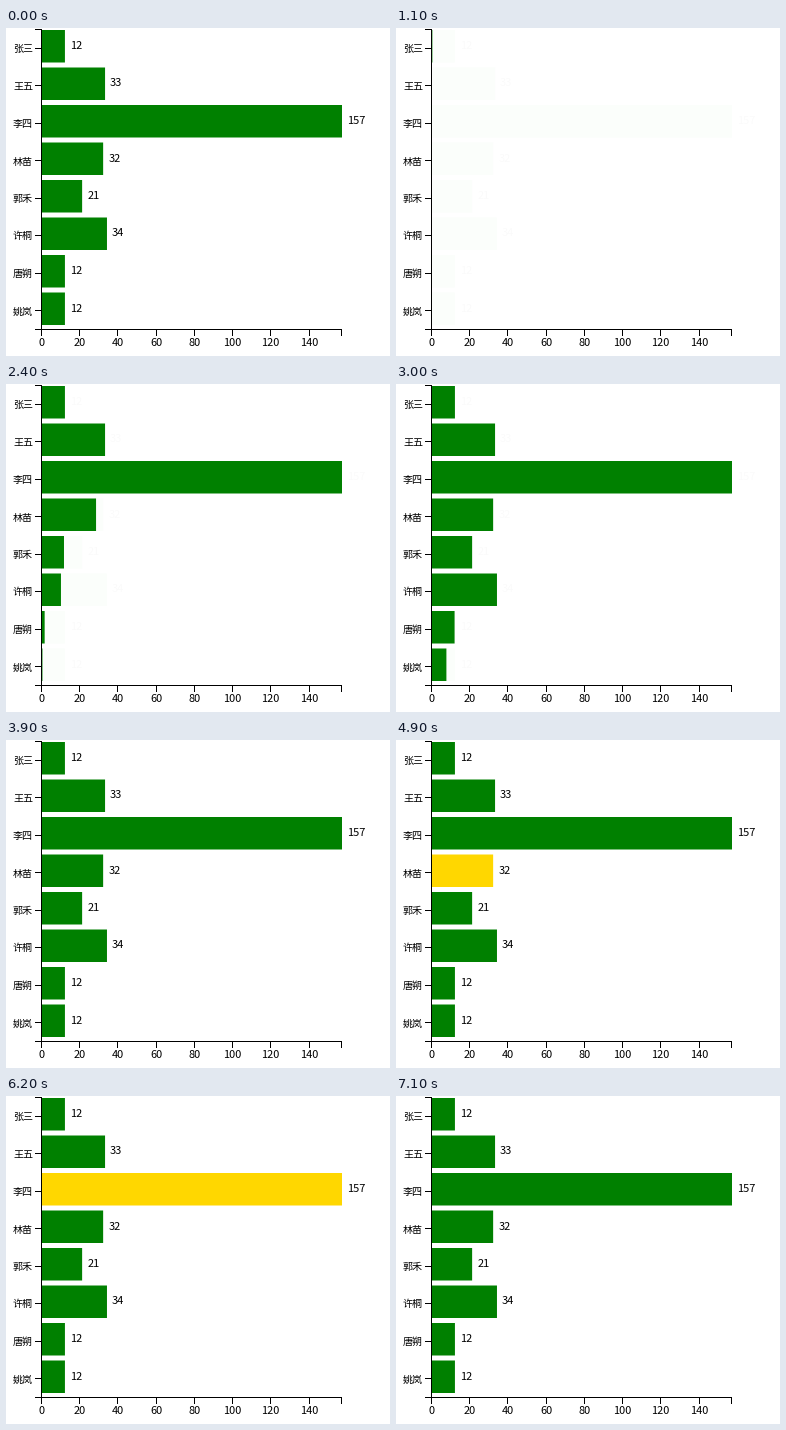
Animation of 384 by 328 pixels, one loop 7.6 s. Source, as a matplotlib script:

```python
import matplotlib.pyplot as plt
from matplotlib.animation import FuncAnimation
from matplotlib.patches import Rectangle

W, H, DPI = 384, 328, 64
STEP_MS, LOOP_MS = 100, 7600
GREEN, GOLD, GHOST = "#008000", "#ffd700", "#fbfefb"

NAMES = ["张三", "王五", "李四", "林苗", "郭禾", "许桐", "唐朔", "姚岚"]
VALUES = [12, 33, 157, 32, 21, 34, 12, 12]
SCALE = 300 / max(VALUES)
BAND, BAR_HEIGHT = 37.5, 32.5
LEFT, TOP, BOTTOM, RIGHT = 35, 1, 301, 335

RELOAD_MS = 1100
GROW_START, GROW_DELAY, GROW_MS = 983, 184, 920
FADE_START, FADE_MS = 3400, 500
GHOST_ALPHA = 0.02

# Time at which the pointer moves, and the bar it then rests on.
HOVERS = [(4400, 2), (4900, 3), (5200, None), (5300, 4), (5600, None),
          (5700, 5), (5900, 4), (6100, 3), (6200, 2), (6500, 1),
          (6800, None), (6900, 2), (7100, None)]

plt.rcParams["font.family"] = "Noto Sans CJK JP"
fig = plt.figure(figsize=(W / DPI, H / DPI), dpi=DPI, facecolor="white")
ax = fig.add_axes([0, 0, 1, 1])
ax.set_xlim(0, W)
ax.set_ylim(H, 0)
ax.axis("off")


def box(x, y, width, height, color):
    return ax.add_patch(Rectangle((x, y), width, height, facecolor=color,
                                  linewidth=0, snap=False))


def label(x, y, text, px, align):
    return ax.text(x, y, text, fontsize=px * 72 / DPI, color="black",
                   ha=align, va="baseline")


def clamp(t):
    return min(max(t, 0), 1)


def draw_axes():
    box(LEFT, TOP, 1, BOTTOM - TOP + 1, "black")
    box(LEFT, BOTTOM, RIGHT - LEFT + 1, 1, "black")
    for y in (TOP, BOTTOM):
        box(LEFT - 6, y, 6, 1, "black")
    box(RIGHT, BOTTOM, 1, 7, "black")
    for i, name in enumerate(NAMES):
        box(LEFT - 6, round(TOP + BAND * (i + 0.5)), 6, 1, "black")
        label(27, 24 + BAND * i, name, 10, "right")
    for value in range(0, 141, 20):
        x = LEFT + round(value * SCALE)
        box(x, BOTTOM, 1, 7, "black")
        label(x + 0.5, 318, str(value), 11, "center")


ghosts, bars, counts = [], [], []
for i, value in enumerate(VALUES):
    width = value * SCALE
    y = 2 + BAND * i
    ghosts.append(box(LEFT + 1, y, width, BAR_HEIGHT, GHOST))
    bars.append(box(LEFT + 1, y, width, BAR_HEIGHT, GREEN))
    counts.append(label(LEFT + 6 + width, 21 + BAND * i, str(value), 11, "left"))
draw_axes()


def hovered_bar(ms):
    current = None
    for start, bar in HOVERS:
        if ms >= start:
            current = bar
    return current


def update(frame):
    ms = frame * STEP_MS
    loaded = ms < RELOAD_MS
    active = hovered_bar(ms)
    fade = 1 if loaded else max(GHOST_ALPHA, clamp((ms - FADE_START) / FADE_MS))
    for i, value in enumerate(VALUES):
        t = clamp((ms - GROW_START - GROW_DELAY * i) / GROW_MS)
        grown = 1 if loaded else t * t
        ghosts[i].set_visible(grown < 1)
        bars[i].set_width(value * SCALE * grown)
        bars[i].set_facecolor(GOLD if i == active else GREEN)
        counts[i].set_alpha(fade)
    return ghosts + bars + counts


anim = FuncAnimation(fig, update, frames=LOOP_MS // STEP_MS,
                     interval=STEP_MS, repeat=True, repeat_delay=0)
plt.show()
```
